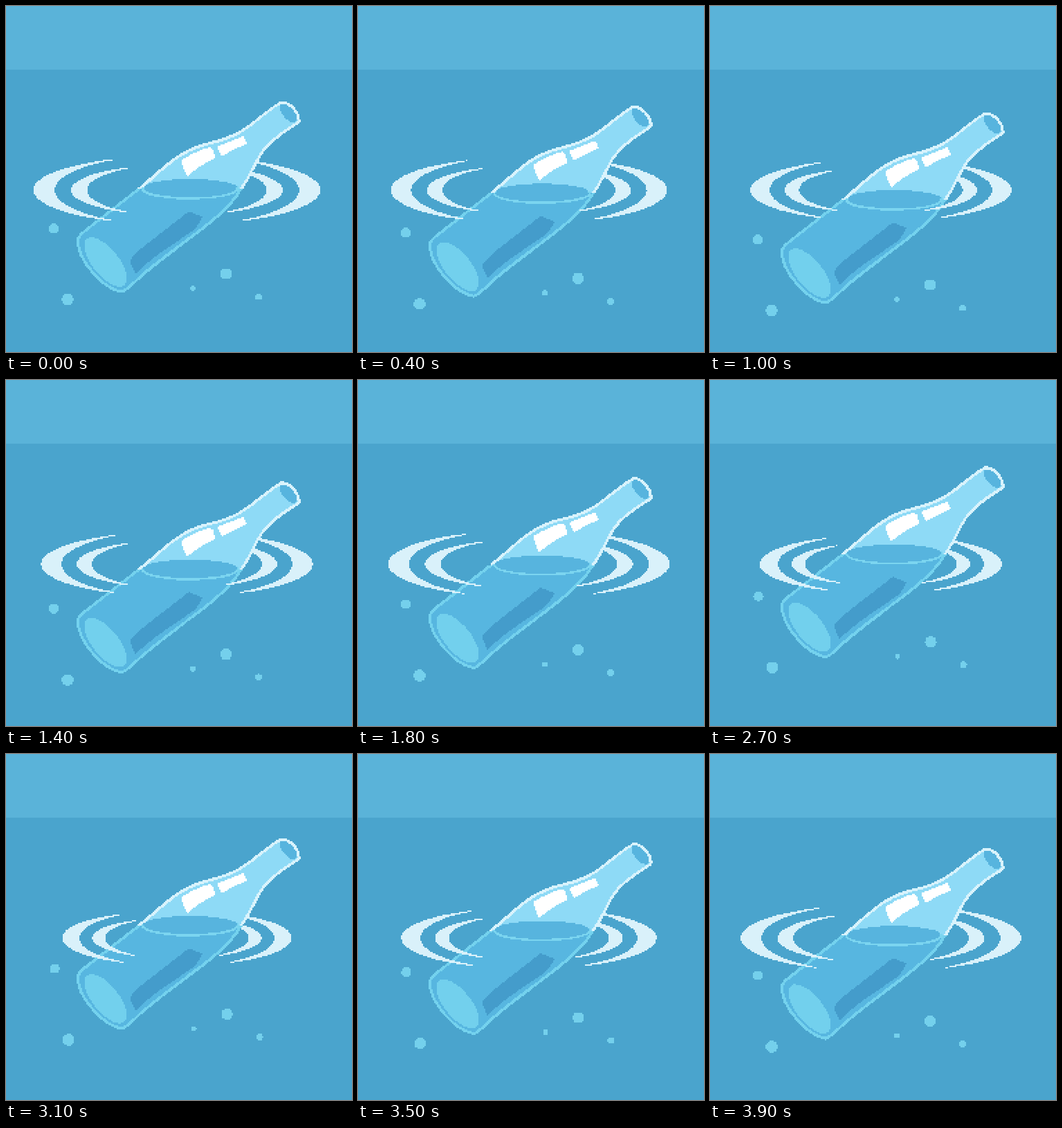
These frames come from a looping animation (500 px wide and 500 px high, 4000 ms). An HTML page with a canvas:

```html
<!DOCTYPE html>
<html lang="en">
<head>
<meta charset="utf-8">
<style>
  html, body { margin: 0; width: 100%; height: 100%; overflow: hidden; background: #4aa4cd; }
  canvas { display: block; width: 500px; height: 500px; image-rendering: pixelated; }
</style>
</head>
<body>
<canvas id="stage" width="250" height="250"></canvas>
<script>
const SIZE = 250, LOOP = 4000, STEP = 100, WATER = 264;
const stage = document.getElementById('stage').getContext('2d');
const scratchCanvas = document.createElement('canvas');
scratchCanvas.width = scratchCanvas.height = SIZE;
const pen = scratchCanvas.getContext('2d', { willReadFrequently: true });

const bottle = new Path2D(`M398 139 C410 139 425 154 423 168 C408 178 385 190 371 210
  C358 228 355 245 337 268 C325 290 300 310 270 332 C240 355 205 380 187 398
  C180 404 174 411 167 413 C140 408 104 368 104 340 C103 331 112 327 118 322
  L195 262 C225 238 250 208 292 199 C350 186 355 165 398 139Z`);
const shade = new Path2D(`M264 297 L284 305 Q277 320 268 326 L230 352
  Q205 369 187 387 L180 371 L181 365 Q193 351 206 342 Z`);
const shines = new Path2D(`M253 223 Q275 209 295 204 L299 207 L303 220
  Q281 229 262 246 L257 236Z M305 203 L343 188 L348 199 Q330 206 312 217Z`);
const bubbles = [[69, 321, 7], [89, 424, 8.5], [318, 387, 8], [270, 408, 4], [365, 420, 5]];

// Draws one flat shape with hard pixel edges, in stage coordinates.
function layer(color, dy, draw, cut = 128) {
  pen.clearRect(0, 0, SIZE, SIZE);
  pen.save();
  pen.scale(0.5, 0.5);
  pen.translate(0, dy);
  pen.fillStyle = pen.strokeStyle = color;
  pen.lineWidth = 4;
  draw();
  pen.restore();
  const image = pen.getImageData(0, 0, SIZE, SIZE), data = image.data;
  const value = parseInt(color.slice(1), 16);
  for (let i = 0; i < data.length; i += 4) {
    if (data[i + 3] >= cut) {
      data[i] = value >> 16;
      data[i + 1] = value >> 8 & 255;
      data[i + 2] = value & 255;
      data[i + 3] = 255;
    } else {
      data[i + 3] = 0;
    }
  }
  pen.putImageData(image, 0, 0);
  stage.drawImage(scratchCanvas, 0, 0);
}

function band(top, bottom) {
  pen.beginPath();
  pen.rect(0, top, 500, bottom - top);
  pen.clip();
}

function ellipse(x, y, rx, ry, angle = 0, from = 0, to = Math.PI * 2) {
  pen.beginPath();
  pen.ellipse(x, y, rx, ry, angle, from, to);
}

function ripples(scale, top) {
  layer('#d9f1fa', 0, () => {
    band(top, 500);
    pen.translate(247, 266);
    for (const ring of [1, 0.737]) {
      for (const side of [-1, 1]) {
        pen.save();
        pen.scale(side * ring * scale, ring * scale);
        ellipse(0, 0, 207, 49.5, 0, -1.142, 1.142);
        pen.ellipse(0, 0, 177, 51.5, 0, 1.064, -1.064, true);
        pen.fill();
        pen.restore();
      }
    }
  }, 64);
}

function drawBottle(dy) {
  layer('#57b6e0', dy, () => pen.fill(bottle));
  layer('#449ccb', dy, () => pen.fill(shade));
  layer('#72d0ed', dy, () => {
    ellipse(144, 370, 43, 19, 0.89);
    pen.fill();
  });
  layer('#8edaf6', dy, () => {
    band(0, WATER);
    pen.fill(bottle);
  });
  layer('#57b4de', dy, () => {
    ellipse(266, WATER, 69, 14);
    pen.fill();
    ellipse(408, 154, 17, 8.5, 0.89);
    pen.fill();
  });
  layer('#7bd5f0', dy, () => {
    pen.lineWidth = 3;
    ellipse(266, WATER, 69, 14, 0, -0.2, Math.PI + 0.2);
    pen.stroke();
  });
  layer('#ffffff', dy, () => pen.fill(shines));
  layer('#74d2ee', dy, () => {
    band(WATER, 500);
    pen.stroke(bottle);
  });
  layer('#d9f3fc', dy, () => {
    band(0, WATER);
    pen.stroke(bottle);
  });
}

function render(time) {
  const beat = time / 1000;
  const peak = at => Math.max(0, 1 - Math.abs(beat - at));
  const sink = peak(1), rise = peak(3);
  const scale = 1 - 0.09 * sink - 0.222 * rise;

  stage.fillStyle = '#4aa4cd';
  stage.fillRect(0, 0, SIZE, SIZE);
  stage.fillStyle = '#5ab3d9';
  stage.fillRect(0, 0, SIZE, 46);

  ripples(scale, 0);
  drawBottle(16 * sink - 18 * rise);
  ripples(scale, 270);
  layer('#74d0ec', 16 * sink - 12 * rise, () => {
    for (const [x, y, r] of bubbles) {
      ellipse(x + 1.5 * rise, y, r, r);
      pen.fill();
    }
  });
}

let shown = -1;
const start = performance.now();
function tick() {
  const time = Math.floor((performance.now() - start) % LOOP / STEP) * STEP;
  if (time !== shown) render(shown = time);
  requestAnimationFrame(tick);
}
tick();
</script>
</body>
</html>
```
